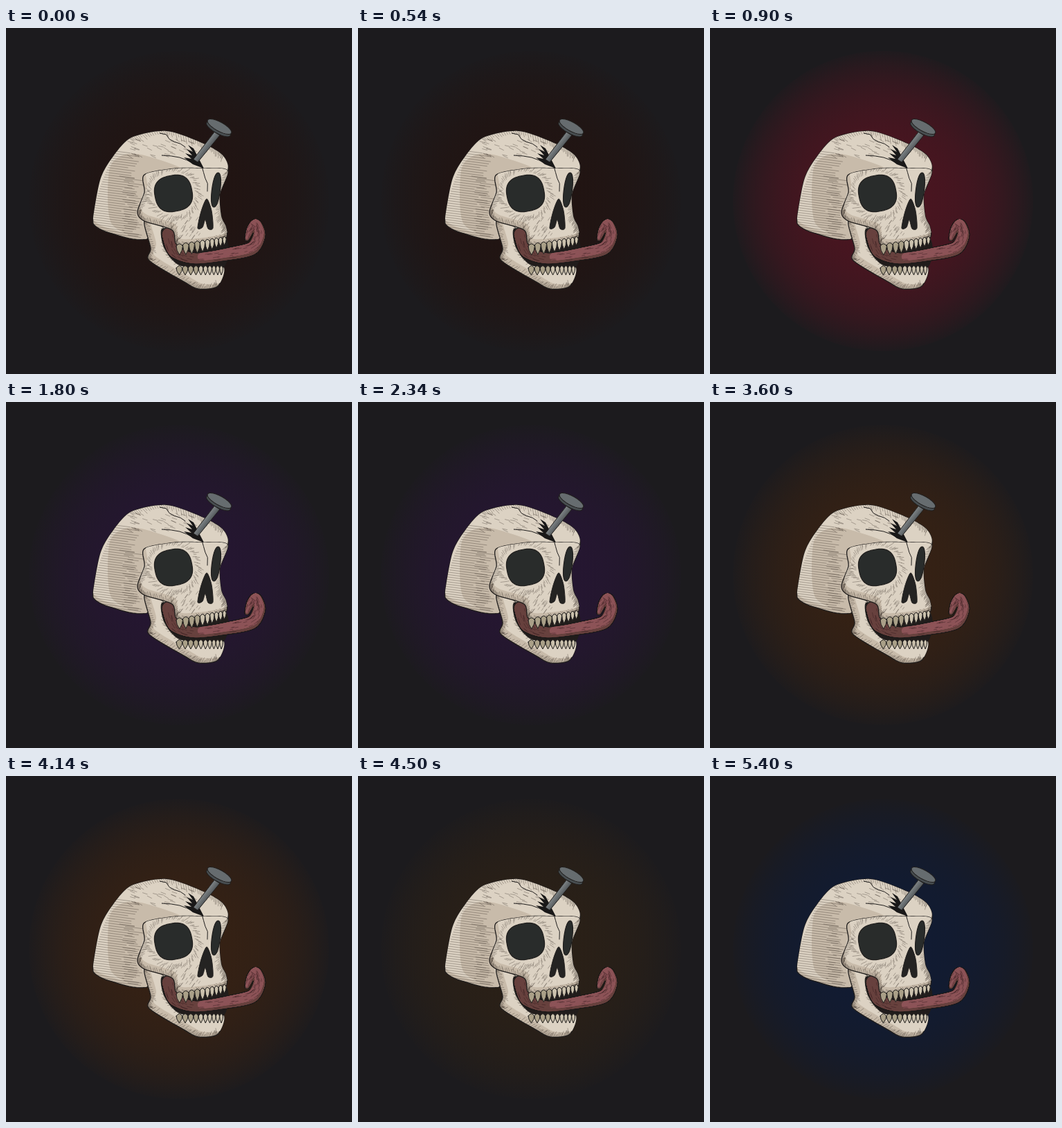
Animation, 500 px wide and 500 px high, one loop 6300 ms. Source, as an HTML page with a canvas:

```html
<!DOCTYPE html>
<html lang="en">
<head>
<meta charset="utf-8">
<title>Skull with nail</title>
<style>
  html, body { margin: 0; width: 100%; height: 100%; overflow: hidden; background: #1c1b1e; }
  canvas { display: block; width: 100vw; height: 100vh; }
</style>
</head>
<body>
<canvas id="stage" width="500" height="500"></canvas>
<script>
const ctx = document.getElementById('stage').getContext('2d');
const HOLD = 900;
const TAU = Math.PI * 2;
const GLOWS = ['#211412', '#491520', '#251631', '#292a23', '#352114', '#2a2017', '#111b32'];
const NIGHT = '#1c1b1e', INK = '#1f1d1c', LIGHT = '#dcd2c3', SHADE = '#c8bbaa', SOCKET = '#292c2b';

// Key points; the curves between them are computed.
const cranium = [[126, 274], [136, 220], [151, 191], [180, 159], [232, 149], [285, 167], [314, 185],
  [320, 210], [290, 265], [203, 305], [150, 296], [129, 286]];
const temple = [[149, 206], [168, 184], [200, 184], [258, 206], [206, 222], [194, 265], [203, 305], [152, 282]];
const face = [[200, 212], [245, 203], [285, 203], [320, 206], [309, 240], [311, 272], [318, 288], [317, 304],
  [282, 312], [247, 313], [240, 292], [200, 279], [190, 266], [200, 237]];
const jaw = [[200, 279], [209, 318], [207, 336], [256, 366], [278, 377], [306, 373], [313, 344], [255, 340],
  [233, 320], [228, 290]];
const mouth = [[225, 291], [246, 293], [316, 302], [313, 347], [252, 343], [229, 318]];
const nose = [[290, 247], [282, 265], [277, 289], [284, 288], [288, 277], [292, 290], [299, 289], [297, 264]];
const tongue = [[235, 298], [244, 323], [274, 333], [325, 326], [356, 318], [366, 299], [361, 284], [353, 292], [348, 305]];

let seed;
function rnd(low = 0, high = 1) {
  seed = (seed * 16807) % 2147483647;
  return low + (high - low) * seed / 2147483647;
}

// Point on a smooth curve; u counts key points.
function along(points, u, closed = true) {
  const n = points.length, i = Math.floor(u), t = u - i;
  const key = j => points[closed ? (j + n) % n : Math.min(Math.max(j, 0), n - 1)];
  const [p, a, b, q] = [key(i - 1), key(i), key(i + 1), key(i + 2)];
  const blend = t * t * (3 - 2 * t), out = t * (1 - t) ** 2, into = t * t * (t - 1);
  return [0, 1].map(k => a[k] + (b[k] - a[k]) * blend + 0.4 * ((b[k] - p[k]) * out + (q[k] - a[k]) * into));
}

function polygon(points) {
  const shape = new Path2D();
  points.forEach(([x, y]) => shape.lineTo(x, y));
  shape.closePath();
  return shape;
}

function smooth(points) {
  return polygon(Array.from({ length: points.length * 12 }, (_, i) => along(points, i / 12)));
}

function fill(shape, color, line = 0) {
  ctx.fillStyle = color;
  ctx.fill(shape);
  if (!line) return;
  ctx.strokeStyle = INK;
  ctx.lineWidth = line;
  ctx.stroke(shape);
}

// Superellipse, drawn around its own centre.
function blob(cx, cy, rx, ry, tilt, power, color, line) {
  const bend = v => Math.sign(v) * Math.abs(v) ** (2 / power);
  const points = Array.from({ length: 72 }, (_, i) => {
    const a = i / 72 * TAU;
    return [rx * bend(Math.cos(a)), ry * bend(Math.sin(a))];
  });
  ctx.save();
  ctx.translate(cx, cy);
  ctx.rotate(tilt);
  fill(polygon(points), color, line);
  ctx.restore();
}

function inside(shape, draw) {
  ctx.save();
  ctx.clip(shape);
  draw();
  ctx.restore();
}

function mark(x, y, angle, length) {
  ctx.beginPath();
  ctx.moveTo(x, y);
  ctx.lineTo(x + Math.cos(angle) * length, y + Math.sin(angle) * length);
  ctx.stroke();
}

function pen(alpha) {
  ctx.strokeStyle = `rgba(45, 36, 30, ${alpha})`;
  ctx.lineWidth = 0.65;
}

// Short strokes growing inwards from part of an outline.
function rim(points, from, to, lean, length) {
  for (let u = from; u < to; u += 0.06) {
    const [x, y] = along(points, u), [nx, ny] = along(points, u + 0.01);
    mark(x, y, Math.atan2(ny - y, nx - x) + lean + rnd(-0.15, 0.15), length * rnd(0.4, 1.1));
  }
}

// One row of strokes after another, with ragged ends.
function rows(top, bottom, left, length) {
  for (let y = top; y < bottom; y += 3.4) mark(left(y), y, 0.13, length(y) * rnd(0.6, 1.1));
}

function jag(x0, y0, x1, y1, steps) {
  ctx.beginPath();
  for (let i = 0; i <= steps; i++) {
    const t = i / steps, wobble = Math.sin(t * Math.PI) * rnd(-4, 4);
    ctx.lineTo(x0 + (x1 - x0) * t + wobble, y0 + (y1 - y0) * t - wobble);
  }
  ctx.strokeStyle = INK;
  ctx.lineWidth = 1;
  ctx.stroke();
}

// Light bone with its own outline shifted to leave a shaded edge.
function bone(shape, dx, dy, hatch) {
  fill(shape, SHADE, 1.3);
  inside(shape, () => {
    ctx.save();
    ctx.translate(dx, dy);
    fill(shape, LIGHT);
    ctx.restore();
    pen(0.5);
    hatch();
  });
}

function drawCranium() {
  bone(smooth(cranium), 0, -6, () => {
    fill(smooth(temple), SHADE);
    rows(178, 304, y => 126 + 33 * Math.max(0, (270 - y) / 93) ** 1.35, y => 34 + (y - 178) * 0.3);
    rows(214, 300, () => rnd(164, 180), () => 22);
    rim(cranium, 3, 6, 1.1, 10);
    for (let i = 0; i < 45; i++) mark(rnd(175, 270), rnd(160, 185), rnd(0.2, 0.6), 7);
  });
}

function drawTeeth(left, width, top, bottom) {
  for (let i = 0; i < 10; i++, left += width, width *= 0.94) {
    const middle = left + width / 2, right = left + width;
    const y0 = top(middle), y1 = bottom(middle), waist = y0 + (y1 - y0) * 0.6;
    fill(new Path2D(`M${left} ${y0 + 4} Q${middle} ${y0 - 3} ${right} ${y0 + 4}
      Q${right} ${waist} ${middle} ${y1} Q${left} ${waist} ${left} ${y0 + 4}Z`), i < 4 ? '#aaa088' : '#cbc1ad', 1);
  }
}

function drawJaw() {
  bone(smooth(jaw), 8, -7, () => {
    rim(jaw, 0, 5, -1.1, 9);
    rim(jaw, 6, 9, -0.8, 8);
  });
  fill(smooth(mouth), '#211c1b', 1);
  drawTeeth(246, 8.8, () => 343, () => 357);
}

function drawTongue() {
  const end = tongue.length - 1;
  const half = u => 2.5 + 7.3 * (1 - (u / end) ** 4) - 2 * Math.exp(-((u - 2) ** 2));
  const ribbon = (from, scale, grow, lift, color) => {
    ctx.fillStyle = color;
    for (let u = from; u <= end; u += 0.02) {
      const [x, y] = along(tongue, u, false);
      ctx.beginPath();
      ctx.arc(x, y - lift, half(u) * scale + grow, 0, TAU);
      ctx.fill();
    }
  };
  ribbon(0, 1, 0.6, 0, INK);
  ribbon(0, 1, -0.5, 0, '#68423f');
  ribbon(2.2, 0.72, 0, 2, '#8d5458');

  ctx.strokeStyle = 'rgba(48, 24, 27, 0.6)';
  ctx.lineWidth = 0.7;
  for (let i = 0; i < 85; i++) {
    const u = rnd(0.1, end - 0.5), [x, y] = along(tongue, u, false), [nx, ny] = along(tongue, u + 0.1, false);
    const angle = Math.atan2(ny - y, nx - x), offset = half(u) * rnd(-0.75, 0.75);
    mark(x - Math.sin(angle) * offset, y + Math.cos(angle) * offset, angle, rnd(3, 9));
  }
}

function drawFace() {
  bone(smooth(face), 4, -9, () => {
    // Strokes fan out around the eye socket.
    for (let i = 0; i < 100; i++) {
      const a = i / 100 * TAU, reach = rnd(1.1, 1.3);
      mark(242 + 28 * reach * Math.cos(a), 239 + 28 * reach * Math.sin(a), a + 0.5, rnd(3, 8));
    }
    rim(face, 3, 13, 1, 9);
    for (let i = 0; i < 45; i++) mark(rnd(225, 282), rnd(273, 300), 2.2, rnd(3, 8));
  });
  drawTeeth(246, 9.4, x => 312 - 0.16 * (x - 246), x => 328 - 15 * ((x - 246) / 72) ** 2);
  blob(242, 239, 27, 26, -0.2, 2.6, SOCKET, 1.2);
  blob(303.5, 234, 6, 25, 0.13, 2.2, SOCKET, 1.2);
  fill(smooth(nose), '#242322', 1);
}

function drawCracks() {
  jag(222, 152, 259, 172, 5);
  jag(225, 184, 271, 196, 4);
  jag(283, 200, 291, 236, 4);
  const hole = [[286, 203], [270, 197]];
  for (let i = 0; i < 4; i++) hole.push([257 + 2 * i, 187 - 6 * i], [268 + i, 189 - 5 * i]);
  fill(polygon(hole), '#191818');
}

function drawNail() {
  const metal = ctx.createLinearGradient(284, 168, 293, 175);
  metal.addColorStop(0, '#8b9193');
  metal.addColorStop(1, '#54595c');
  fill(polygon([[301, 150], [309, 155], [277, 194], [271, 190]]), metal, 1);
  blob(307, 146, 19.5, 6.5, 0.5, 2, '#484e51', 1);
  blob(308.5, 142.5, 19.5, 6.5, 0.5, 2, '#666c6f', 1);
}

function drawGlow(color) {
  const radius = 217, steps = 10;
  const glow = ctx.createRadialGradient(250, 250, 0, 250, 250, radius);
  for (let i = 0; i <= steps; i++) {
    const alpha = Math.round(255 * (1 - 0.93 * (i / steps) ** 3));
    glow.addColorStop(i / steps, color + alpha.toString(16).padStart(2, '0'));
  }
  ctx.fillStyle = NIGHT;
  ctx.fillRect(0, 0, 500, 500);
  ctx.fillStyle = glow;
  ctx.beginPath();
  ctx.arc(250, 250, radius, 0, TAU);
  ctx.fill();
}

function drawScene(color) {
  seed = 4127;
  ctx.lineJoin = ctx.lineCap = 'round';
  drawGlow(color);
  drawCranium();
  drawJaw();
  drawTongue();
  drawFace();
  drawCracks();
  drawNail();
}

let shown = -1;
function tick() {
  const index = Math.floor(performance.now() / HOLD) % GLOWS.length;
  if (index !== shown) {
    shown = index;
    drawScene(GLOWS[index]);
  }
  requestAnimationFrame(tick);
}
tick();
</script>
</body>
</html>
```
